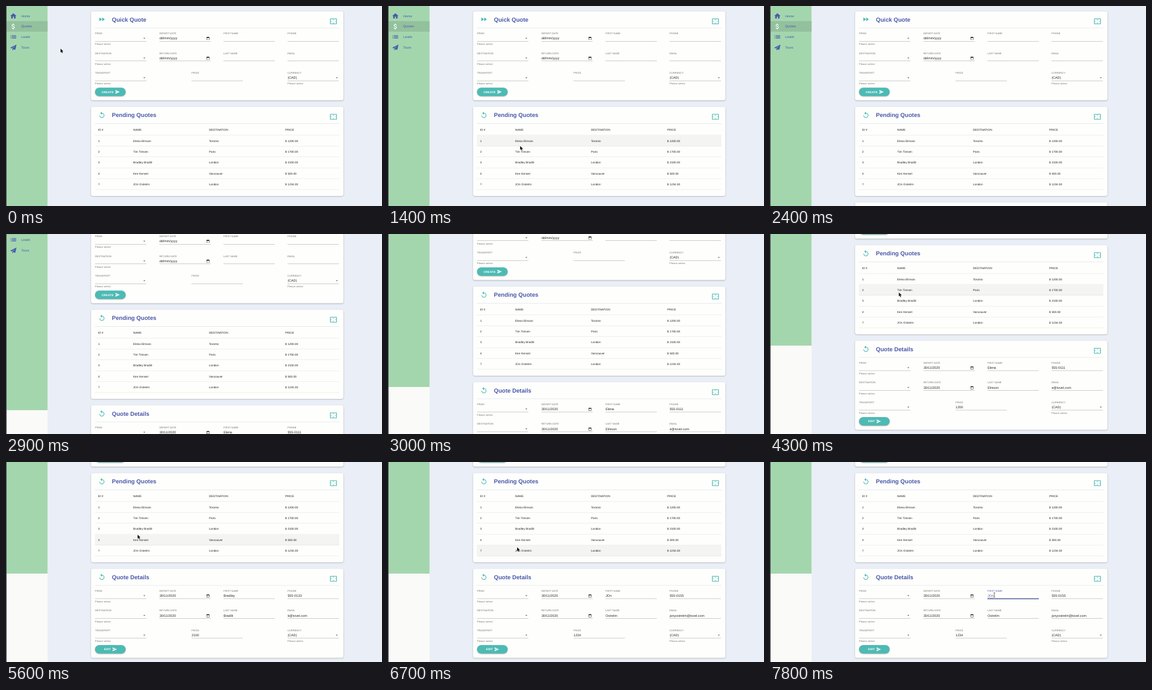
Recreate the animation shown at these times as an HTML page with a canvas. Size 600 by 319 pixels, loop 8 s.

```html
<!DOCTYPE html>
<html lang="en">
<head>
<meta charset="utf-8">
<title>Quotes</title>
<style>
  html, body { margin: 0; width: 100%; height: 100%; overflow: hidden; background: #eaeef6; }
  canvas { display: block; width: 600px; height: 319px; }
</style>
</head>
<body>
<canvas id="stage"></canvas>
<script>
const W = 600, H = 319, LOOP = 8000, STEP = 100;
const canvas = document.getElementById('stage');
const ctx = canvas.getContext('2d');
const dpr = window.devicePixelRatio || 1;
canvas.width = W * dpr;
canvas.height = H * dpr;

const INDIGO = '#4a59ab', TEAL = '#4dbab4', INK = 'rgba(0,0,0,.87)', MUTED = 'rgba(0,0,0,.56)';
const FONT = '"Liberation Sans", Arial, sans-serif';

const icons = {
  home: 'M10 20v-6h4v6h5v-8h3L12 3 2 12h3v8z',
  dollar: 'M11.8 10.9c-2.27-.59-3-1.2-3-2.15 0-1.09 1.01-1.85 2.7-1.85 1.78 0 2.44.85 2.5 2.1h2.21c-.07-1.72-1.12-3.3-3.21-3.81V3h-3v2.16c-1.94.42-3.5 1.68-3.5 3.61 0 2.31 1.91 3.46 4.7 4.13 2.5.6 3 1.48 3 2.41 0 .69-.49 1.79-2.7 1.79-2.06 0-2.87-.92-2.98-2.1h-2.2c.12 2.19 1.76 3.42 3.68 3.83V21h3v-2.15c1.95-.37 3.5-1.5 3.5-3.55 0-2.84-2.43-3.81-4.7-4.4z',
  list: 'M3 13h2v-2H3zm0 4h2v-2H3zm0-8h2V7H3zm4 4h14v-2H7zm0 4h14v-2H7zM7 7v2h14V7z',
  plane: 'M22 3L2 13l5 2.5L18 7l-9 9v6l3.5-4L18 20z',
  send: 'M2 21L23 12 2 3v7l15 2-15 2z',
  replay: 'M12 5V1L7 6l5 5V7c3.31 0 6 2.69 6 6s-2.69 6-6 6-6-2.69-6-6H4c0 4.42 3.58 8 8 8s8-3.58 8-8-3.58-8-8-8z',
  forward: 'M4 18l8.5-6L4 6v12zm9-12v12l8.5-6L13 6z',
  expand: 'M12 5.5L10 8h4zM18 10v4l2.5-2zM6 10l-2.5 2L6 14zm8 6h-4l2 2.5zm7-13H3c-1.1 0-2 .9-2 2v14c0 1.1.9 2 2 2h18c1.1 0 2-.9 2-2V5c0-1.1-.9-2-2-2zm0 16H3V5h18z',
  caret: 'M7 10l5 5 5-5z',
  calendar: 'M20 3h-1V1h-2v2H7V1H5v2H4c-1.1 0-2 .9-2 2v16c0 1.1.9 2 2 2h16c1.1 0 2-.9 2-2V5c0-1.1-.9-2-2-2zm0 18H4V9h16z',
  arrow: 'M0 0v17l4-3.6 2.8 6.4 3-1.3-2.8-6.2h5.6z'
};
for (const k in icons) icons[k] = new Path2D(icons[k]);

const menu = [['home', 'Home'], ['dollar', 'Quotes'], ['list', 'Leads'], ['plane', 'Tours']];
const quotes = [
  { id: '1', first: 'Elena', last: 'Elmson', city: 'Toronto', price: 1200, phone: '555-0111', mail: 'e@tovel.com' },
  { id: '2', first: 'Tim', last: 'Timsen', city: 'Paris', price: 1700, phone: '555-0122', mail: 't@tovel.com' },
  { id: '3', first: 'Bradley', last: 'Bradlit', city: 'London', price: 2100, phone: '555-0133', mail: 'b@tovel.com' },
  { id: '4', first: 'Ken', last: 'Kenset', city: 'Vancouver', price: 500, phone: '555-0144', mail: 'k@tovel.com' },
  { id: '7', first: 'JOn', last: 'Ostrelm', city: 'London', price: 1234, phone: '555-0155', mail: 'jonyostrelm@tovel.com' }
];

const COLS = [142, 244.7, 347, 449.2], FIELD_W = 82;
const TABLE_COLS = [147, 203, 324, 445.5];
const ROW_TOP = 206.2, ROW_H = 17.38, DETAILS_Y = 304.8;

// click times, one per quote
const clicks = [1900, 4600, 5300, 5800, 6700];
const scrollSteps = [40, 77, 105, 129, 138, 143];
// pointer moves: first step, last step, end x, end y
const moves = [
  [200, 500, 125, 94], [700, 800, 215, 158], [1000, 1200, 212, 229], [1400, 1700, 209, 214],
  [1900, 2100, 210, 215], [2300, 2400, 604, 185], [2900, 3500, 597, 271], [3700, 3900, 206, 93],
  [4300, 4300, 205.6, 93.3], [4700, 5100, 206, 107], [5500, 5600, 210, 116],
  [5700, 5800, 208, 122], [6100, 6400, 206, 136], [6800, 6900, 288, 191], [7100, 7400, 358, 212]
];

function pointerAt(t) {
  let x = 87, y = 68;
  for (const [from, to, ex, ey] of moves) {
    if (t < from) break;
    const p = Math.min(1, (t - from + STEP) / (to - from + STEP));
    const e = 1 - Math.pow(1 - p, to - from > 500 ? 2.5 : 1.7);
    x += (ex - x) * e;
    y += (ey - y) * e;
  }
  return { x, y };
}

function scrollAt(t) {
  if (t < 2900) return 0;
  return scrollSteps[Math.min(scrollSteps.length - 1, (t - 2900) / STEP)];
}

function text(str, x, y, size, color = INK, weight = 400, spacing = 0) {
  ctx.font = `${weight} ${size}px ${FONT}`;
  ctx.letterSpacing = spacing + 'px';
  ctx.fillStyle = color;
  ctx.fillText(str, x, y);
}

function rect(x, y, w, h, color) {
  ctx.fillStyle = color;
  ctx.fillRect(x, y, w, h);
}

function icon(name, x, y, scale, color) {
  ctx.save();
  ctx.translate(x, y);
  ctx.scale(scale, scale);
  ctx.fillStyle = color;
  ctx.fill(icons[name], 'evenodd');
  ctx.restore();
}

function panel(x, y, w, h, r, color, blur) {
  ctx.save();
  ctx.shadowColor = 'rgba(0,0,0,.3)';
  ctx.shadowBlur = blur * dpr;
  ctx.shadowOffsetY = .7 * dpr;
  ctx.fillStyle = color;
  ctx.beginPath();
  ctx.roundRect(x, y, w, h, r);
  ctx.fill();
  ctx.restore();
}

function card(y, title, mark) {
  panel(135.7, y, 402.8, 142.2, 3, '#fefefc', 2);
  icon(mark, 147, y + (mark === 'forward' ? 6.8 : 7.4), .5, TEAL);
  text(title, 169, y + 16.6, 9.25, INDIGO, 700);
  icon('expand', 516.5, y + 10, .5, TEAL);
  rect(142, y + 26.4, 390, .6, '#d9deed');
}

function field(label, x, y, opts = {}) {
  const { value, kind, help, hover, focus = 0 } = opts;
  text(label, x, y + 45, 3.93, focus ? INDIGO : MUTED, 400, .03);
  if (value !== undefined) text(value, x + .2, y + 53.3, 5.25, focus ? '#56669a' : INK, 400, .04);
  rect(x, y + 56, FIELD_W, hover ? .66 : .36, hover ? INK : 'rgba(0,0,0,.5)');
  if (focus) {
    rect(x + .2, y + 54.2, ctx.measureText(value).width, .4, '#7f8cb8');
    rect(x + FIELD_W / 2 * (1 - focus), y + 55.8, FIELD_W * focus, .8, '#3f51b5');
  }
  if (kind === 'select') icon('caret', x + 74.8, y + 47.5, .33, MUTED);
  if (kind === 'date') icon('calendar', x + 74.9, y + 48.9, .225, '#111');
  if (help) text('Please select', x, y + 62.3, 3.93, MUTED, 400, .13);
}

function form(y, action, quote, state = {}) {
  const q = quote || { first: '', last: '', phone: '', mail: '', price: '' };
  const date = quote ? '30/11/2020' : 'dd/mm/yyyy';
  const pick = { kind: 'select', help: true };
  const r2 = y + 31.5, r3 = y + 63;
  field('FROM', COLS[0], y, pick);
  field('DEPART DATE', COLS[1], y, { value: date, kind: 'date' });
  field('FIRST NAME', COLS[2], y, { value: q.first, ...state });
  field('PHONE', COLS[3], y, { value: q.phone });
  field('DESTINATION', COLS[0], r2, pick);
  field('RETURN DATE', COLS[1], r2, { value: date, kind: 'date' });
  field('LAST NAME', COLS[2], r2, { value: q.last });
  field('EMAIL', COLS[3], r2, { value: q.mail });
  field('TRANSPORT', COLS[0], r3, pick);
  field('PRICE', 296, r3, { value: String(q.price) });
  field('CURRENCY', COLS[3], r3, { value: '(CAD)', ...pick });
  panel(142, y + 130.2, 49, 13.5, 6.75, TEAL, 1.6);
  const short = action === 'EDIT';
  text(action, short ? 156.6 : 152.4, y + 138.6, 4.59, '#fff', 700, .13);
  icon('send', short ? 169.5 : 174, y + 133, .328, '#fff');
}

function table(hoverRow) {
  ['ID #', 'NAME', 'DESTINATION', 'PRICE'].forEach((h, i) => text(h, TABLE_COLS[i], 198.6, 4.59));
  rect(142, ROW_TOP - .4, 390, .4, '#d8d8d8');
  quotes.forEach((q, i) => {
    const y = ROW_TOP + i * ROW_H;
    if (i === hoverRow) rect(142, y, 390, ROW_H, '#f4f4f2');
    const cells = [q.id, q.first + ' ' + q.last, q.city, '$ ' + q.price.toFixed(2)];
    cells.forEach((c, k) => text(c, TABLE_COLS[k], y + 10.4, 4.59, INK, 400, .03));
    rect(142, y + ROW_H - .4, 390, .4, '#d8d8d8');
  });
}

function sidebar() {
  rect(0, 0, 66.3, 321, '#a4d6ae');
  rect(0, 24.2, 66.3, 16.7, '#93c09d');
  menu.forEach(([mark, label], i) => {
    const y = 16 + i * 16.65;
    icon(mark, 5.8, y - 6, .5, mark === 'dollar' ? '#fff' : INDIGO);
    text(label, 24.2, y + 1.8, 5.25, INDIGO, 400, .05);
  });
}

function pointer({ x, y }, beam) {
  if (beam) {
    rect(x - .35, y - 3.5, .7, 7, '#333');
    rect(x - 1.3, y - 3.7, 2.6, .5, '#333');
    rect(x - 1.3, y + 3.2, 2.6, .5, '#333');
    return;
  }
  ctx.save();
  ctx.translate(x, y);
  ctx.scale(.37, .37);
  ctx.lineWidth = 2.4;
  ctx.strokeStyle = '#fff';
  ctx.stroke(icons.arrow);
  ctx.fillStyle = '#111';
  ctx.fill(icons.arrow);
  ctx.restore();
}

function draw(time) {
  const t = Math.floor(time / STEP) * STEP;
  const scroll = scrollAt(t), mouse = pointerAt(t), pageY = mouse.y + scroll;
  const shown = clicks.filter(c => c <= t).length - 1;
  const row = mouse.x > 142 && mouse.x < 532 ? Math.floor((pageY - ROW_TOP) / ROW_H) : -1;
  const fieldY = pageY - DETAILS_Y;
  const inField = shown >= 0 && mouse.x > COLS[2] && mouse.x < COLS[2] + FIELD_W && fieldY > 46 && fieldY < 57;
  const focus = t < 7600 ? 0 : Math.min(1, (t - 7500) / 300);

  ctx.setTransform(dpr, 0, 0, dpr, 0, 0);
  ctx.textRendering = 'geometricPrecision';
  rect(0, 0, W, H, '#eaeef6');
  rect(0, 0, 66.3, H, '#fafaf8');
  ctx.save();
  ctx.translate(0, -scroll);
  sidebar();
  card(8.4, 'Quick Quote', 'forward');
  form(0, 'CREATE');
  card(160.7, 'Pending Quotes', 'replay');
  table(row);
  if (shown >= 0) {
    card(8.4 + DETAILS_Y, 'Quote Details', 'replay');
    form(DETAILS_Y, 'EDIT', quotes[shown], { hover: inField, focus });
  }
  ctx.restore();
  rect(0, 0, 1, H, '#4c4f4d');
  pointer(mouse, inField);
}

const start = performance.now();
function tick() {
  draw((performance.now() - start) % LOOP);
  requestAnimationFrame(tick);
}
tick();
</script>
</body>
</html>
```
